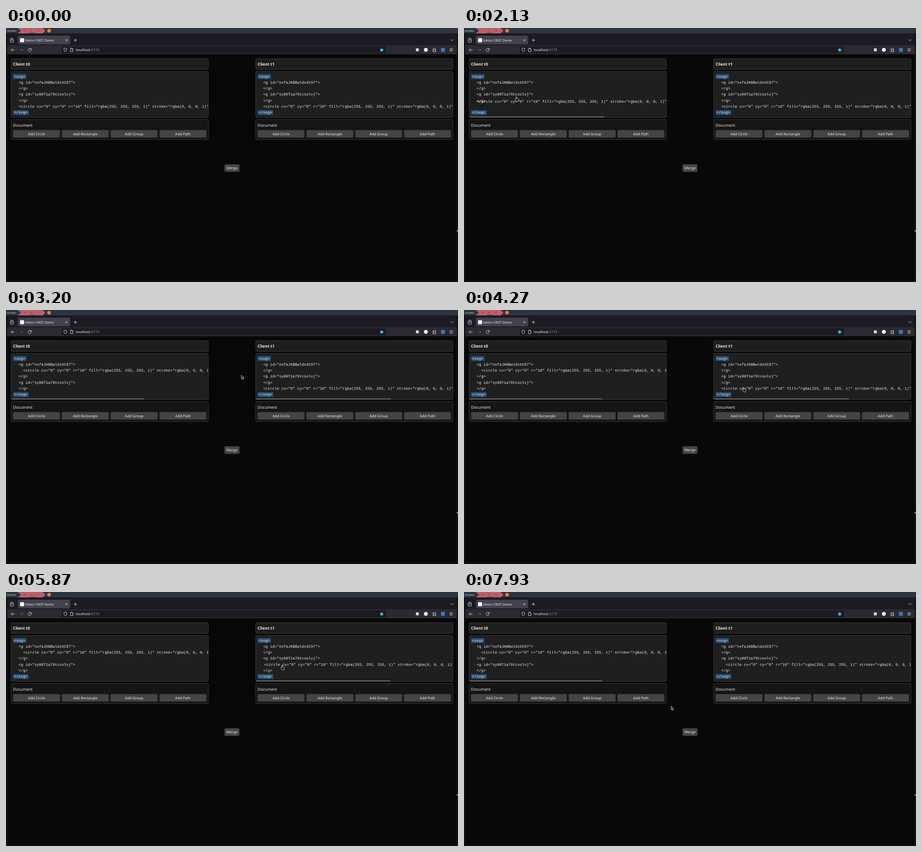
Animation, 998 px wide and 561 px high, one loop 8 s. Source, as an HTML page:

```html
<!DOCTYPE html>
<html lang="en">
<head>
<meta charset="utf-8">
<title>CRDT Demo</title>
<style>
  html, body { margin: 0; width: 100%; height: 100%; overflow: hidden; background: #0c0e12; }
  svg { display: block; width: 998px; height: 561px; }
  text { font-family: "Noto Sans", "Open Sans", sans-serif; fill: #f0f0f0; white-space: pre; text-rendering: geometricPrecision; }
  .code { font: 8.33px "Liberation Mono", monospace; }
  .icon { fill: none; stroke: #e8e8ee; stroke-width: .9; stroke-linecap: round; stroke-linejoin: round; }
</style>
</head>
<body>
<svg viewBox="0 0 998 561">
  <defs>
    <clipPath id="clip"><rect x="11.5" y="96" width="435" height="101.5"/></clipPath>
  </defs>

  <!-- desktop bar -->
  <rect width="998" height="12.3" fill="#2c3441"/>
  <text x="1.5" y="8" style="font:5px 'DejaVu Sans Mono',monospace">columns</text>
  <path d="M26 0H81L87 6 81 12H26L33 6Z" fill="#bd5f68"/>
  <path d="M49 0l6 6-6 6M64 0l6 6-6 6" fill="none" stroke="#a8535d" stroke-width=".7"/>
  <path d="M51 11h12" stroke="#3c4a68" stroke-width="1.4"/>
  <path d="M41 5.5h30.2" stroke="#8f4650" stroke-width="3" stroke-linecap="round" stroke-dasharray="0 15"/>
  <circle cx="95" cy="6" r="4" fill="#ee7a35"/>

  <!-- browser window -->
  <rect x="2" y="13.5" width="994" height="545.5" rx="4" fill="#080808" stroke="#1d2026" stroke-width=".8"/>
  <path d="M2.5 38V18q0-4 4-4H991.5q4 0 4 4V38Z" fill="#1c1b22"/>
  <rect x="2.500" y="38" width="993" height="20" fill="#2b2a33"/>
  <rect x="123" y="40.5" width="716" height="15.5" rx="2" fill="#1c1b22"/>
  <path d="M25.3 18v18" stroke="#44434d" stroke-width=".7"/>
  <rect x="27" y="17" width="114.5" height="19" rx="2.5" fill="#42414d"/>
  <rect x="31" y="22.5" width="9" height="9" rx="1.5" fill="#f2f2f2"/>
  <text x="42" y="29.5" font-size="7.3">Inktor CRDT Demo</text>
  <text x="154" y="51.4" font-size="7.65">localhost<tspan fill="#9a99a3">:5173</tspan></text>
  <g class="icon">
    <path d="M9.5 25h7v5.5q0 1-1 1h-5q-1 0-1-1ZM10.500 22.700h5M11.700 27.500h2.600"/>
    <path d="M131.500 25l4 4m0-4l-4 4M150 27h6.500M153.200 23.700v6.500M982 25.500l3 3 3-3"/>
    <path d="M18.500 48.500h-7m3-3l-3 3 3 3"/>
    <path d="M30.500 48.500h7m-3-3l3 3-3 3" stroke="#66656f"/>
    <path d="M55.300 46.700a3.500 3.500 0 1 0 .4 2.600M56 44.700v2.600h-2.600"/>
    <path d="M131 44.500l3.300 1.200q.2 5-3.300 7-3.500-2-3.300-7Z"/>
    <path d="M142.700 44.700h3.300l2 2v5.500h-5.300ZM145.800 44.800v2h2"/>
    <path d="M942.700 46.700h2q-.4-2 1-2t1 2h2.300v2q-2-.3-2 1t2 1v1.700h-6.300v-2q1.700 0 1.700-1.200t-1.700-1Z"/>
    <path d="M980 45.700h6M980 48.300h6M980 50.900h6"/>
  </g>
  <path d="M829.500 43.800l1.400 3 3.200.4-2.400 2.200.7 3.200-2.900-1.600-2.900 1.600.7-3.200-2.400-2.200 3.200-.4Z" fill="#42c9f7"/>
  <rect x="905" y="45" width="6.500" height="6.500" rx="1" fill="#d8d8de"/>
  <circle cx="927" cy="48.300" r="4.300" fill="#f5f5f5"/>
  <rect x="960.500" y="44" width="8.500" height="8.500" rx="1" fill="#3a78cc"/>

  <g id="clients"></g>
  <rect x="482.400" y="301" width="33.100" height="16.700" rx="3" fill="#464646"/>
  <text x="499" y="312.200" font-size="8" text-anchor="middle">Merge</text>
  <path d="M995 448.700l3-1.200" stroke="#f4f4f4" stroke-width="1.400"/>

  <g id="cursor" fill="#191919" stroke="#f4f4f4" stroke-width=".8" stroke-linejoin="round">
    <path id="arrow" d="M0 0V8L1.900 6.500 3.300 9.400 4.700 8.700 3.400 6H5.700Z"/>
    <path id="hand" d="M-1 5V.9Q-1 0-.2 0T.6.9V3.600Q1.600 3 2.300 3.800 3.200 3.300 3.900 4.100 5.100 3.800 5.200 5V7.200Q5 8.500 4.300 9.900H0L-2.600 6.400Q-2.900 5.200-2 5.200Z"/>
  </g>
</svg>
<script>
const LOOP = 8000, ROW = 13.27, BASE = 109.5, GAP = 540, INDENT = 10;
const CIRCLE = '<circle cx="0" cy="0" r="10" fill="rgba(255, 255, 255, 1)" stroke="rgba(0, 0, 0, 1)" stroke-width="1"></circle>';
const $ = id => document.getElementById(id);

function add(parent, tag, attrs, text) {
  const node = document.createElementNS("http://www.w3.org/2000/svg", tag);
  for (const k in attrs) node.setAttribute(k, attrs[k]);
  if (text) node.textContent = text;
  parent.appendChild(node);
  return node;
}

const put = (node, x, y) => node.setAttribute("transform", `translate(${x} ${y})`);
const clamp = v => Math.min(1, Math.max(0, v));
const ramp = (t, from, to) => clamp((t - from) / (to - from));
const easeOut = p => p * (2 - p);
const mix = (a, b, p) => a + (b - a) * p;

function box(g, y, height, fill) {
  add(g, "rect", { x: 11.3, y, width: 435.5, height, rx: 2.5, fill, stroke: "#505050", "stroke-width": .7 });
}

function client(i) {
  const g = add($("clients"), "g", { transform: `translate(${i * GAP} 0)` });
  box(g, 67.8, 23.6, "#1e1e1e");
  box(g, 96, 101.5, "#1f1f1f");
  box(g, 202.3, 44, "#151516");
  add(g, "text", { x: 15.5, y: 83, "font-size": 8.9, "font-weight": 700 }, "Client t" + i);
  add(g, "text", { x: 15.5, y: 217.7, "font-size": 8.8 }, "Document");
  ["Circle", "Rectangle", "Group", "Path"].forEach((name, n) => {
    const x = 15.5 + n * 107.8;
    add(g, "rect", { x, y: 225.4, width: 103.6, height: 16.7, rx: 2.5, fill: "#444" });
    add(g, "text", { x: x + 51.8, y: 236.8, "font-size": 8, "text-anchor": "middle" }, "Add " + name);
  });

  const code = add(g, "g", { "clip-path": "url(#clip)" });
  const line = (text, x, row) => {
    const node = add(code, "text", { class: "code" }, text);
    put(node, x, BASE + row * ROW);
    return node;
  };
  ["<svg>", "</svg>"].forEach((tag, n) => {
    const y = 101.8 + n * 6 * ROW;
    add(code, "rect", { x: 15.5, y, width: tag.length * 5 + 4.5, height: 10.6, rx: 1, fill: "#264f78" });
    line(tag, 17.5, n * 6);
  });
  const rows = ['<g id="nxfaJKBBwldxXC97">', "</g>", '<g id="sy80T1a79tcsolvj">', "</g>"]
    .map((text, n) => line(text, 28, n + 1));
  const circle = line(CIRCLE, 28, 5);
  const bar = add(code, "rect", { x: 12, y: 195.5, height: 1.8, rx: .9, fill: "#787878" });
  return { rows, circle, bar };
}

// Pointer moves: start, end, x, y reached.
const moves = [
  [330, 1130, 115.5, 163],
  [2070, 2420, 115.5, 128],
  [2730, 3530, 602, 147.3],
  [3600, 4130, 617.5, 171],
  [4270, 5130, 607.5, 174.5],
  [5530, 5870, 609.5, 162],
  [6130, 6930, 125, 185],
  [6930, 7200, 144, 120],
  [7270, 7930, 457.5, 252]
];

function pointer(t) {
  let x = 436, y = 414;
  for (const [from, to, nx, ny] of moves) {
    const p = easeOut(ramp(t, from, to));
    x = mix(x, nx, p);
    y = mix(y, ny, p);
  }
  // a small loop while hovering over the first code box
  const turn = 2 * Math.PI * ramp(t, 1200, 1800);
  return [x - 12 * Math.sin(turn), y + 20 * Math.sin(2 * turn)];
}

// grab and drop times, rows climbed, and when the scrollbar is lit
const clients = [
  { ...client(0), grab: 2070, drop: 2730, climb: 3, lit: [[850, 4350], [6300, LOOP]] },
  { ...client(1), grab: 5530, drop: 5960, climb: 1, lit: [[3000, 7350]] }
];

function drawClient({ rows, circle, bar, grab, drop, climb, lit }, t) {
  const [x0, y0] = pointer(grab);
  const [x, y] = pointer(Math.min(drop, Math.max(grab, t)));
  const settle = easeOut(ramp(t, drop, drop + 120));
  const dx = mix(x - x0, INDENT, settle);
  const dy = mix(y - y0, -climb * ROW, settle);
  put(circle, 28 + dx, BASE + 5 * ROW + dy);

  // a row steps down once the dragged line has nearly taken its place
  rows.forEach((row, n) => {
    const room = clamp((-dy / ROW - (4 - n) + .17) / .1);
    put(row, 28, BASE + (n + 1 + room) * ROW);
  });

  bar.setAttribute("width", 298 - dx / 2);
  bar.setAttribute("opacity", Math.max(...lit.map(([on, off]) => ramp(t, on, on + 100) - ramp(t, off, off + 250))));
}

function draw(t) {
  clients.forEach(c => drawClient(c, t));
  const [x, y] = pointer(t);
  const px = x > 500 ? x - GAP : x;
  const overLine = px > 11 && px < 447 && y > 113 && y < 180;
  put($("cursor"), x, y);
  $("cursor").style.display = t < 330 ? "none" : "";
  $("hand").style.display = overLine ? "" : "none";
  $("arrow").style.display = overLine ? "none" : "";
}

const start = performance.now();
function tick() {
  draw((performance.now() - start) % LOOP);
  requestAnimationFrame(tick);
}
tick();
</script>
</body>
</html>
```
